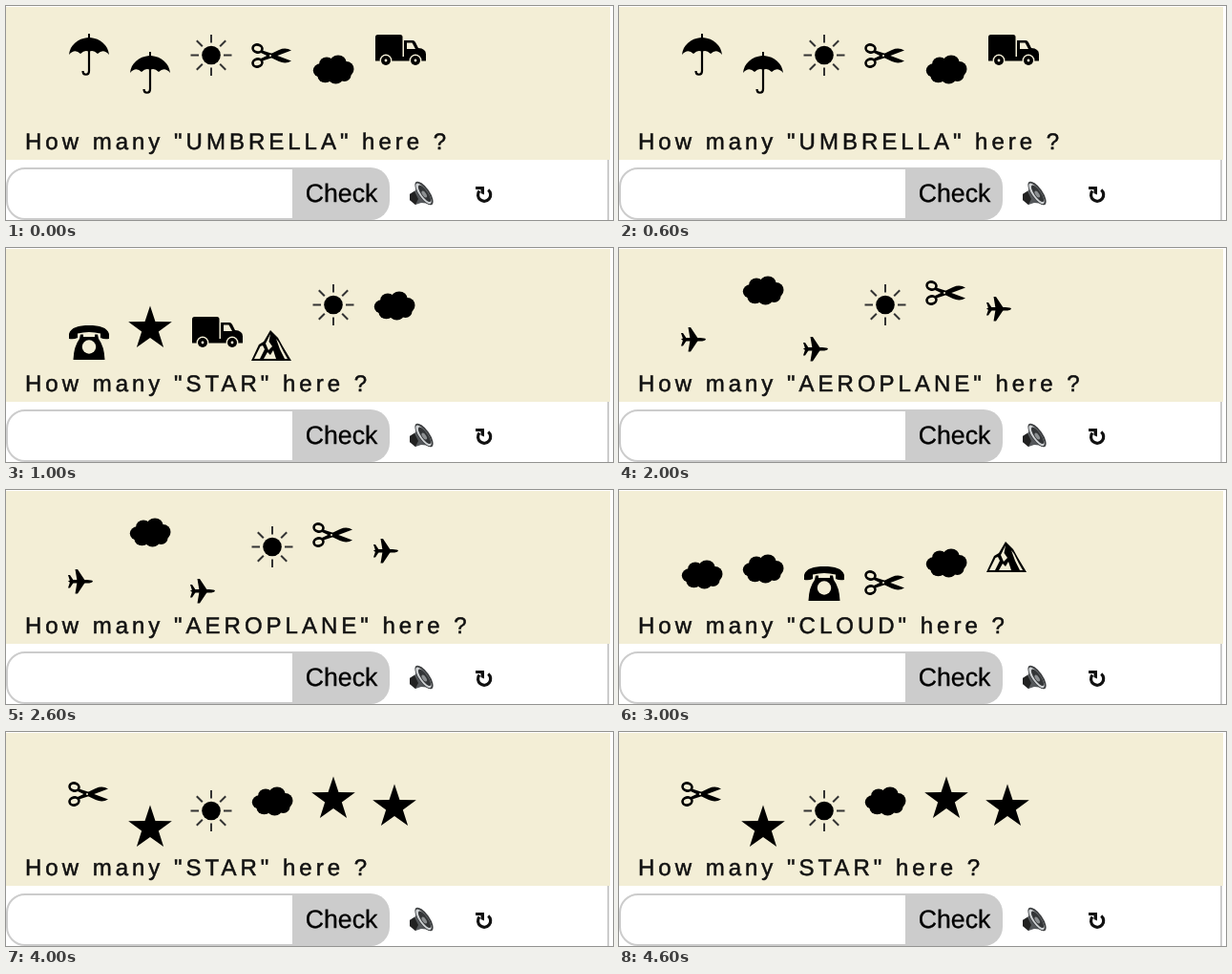
Write an HTML page with a canvas that moves like this. It is 636 px wide and 224 px high and loops after 5000 ms.

```html
<!DOCTYPE html>
<html lang="en">
<head>
<meta charset="utf-8">
<title>Picture quiz</title>
<style>
  html, body { margin: 0; width: 100%; height: 100%; overflow: hidden; background: #fff; }
  #stage { position: relative; width: 636px; height: 224px; }
  canvas { position: absolute; left: 0; top: 0; }
  p {
    position: absolute; margin: 0; white-space: pre; color: #000;
    font-family: "Liberation Sans", Arial, sans-serif;
    font-kerning: normal; text-rendering: geometricPrecision;
  }
  #ask {
    left: 20px; top: 129px; font-size: 24px; line-height: 27px; letter-spacing: 4px;
    color: #111; -webkit-text-stroke: 0.5px #111; filter: blur(0.6px);
  }
  #check { left: 313.8px; top: 181px; font-size: 26.667px; line-height: 30px; -webkit-text-stroke: 0.3px #000; }
</style>
</head>
<body>
<div id="stage">
  <canvas id="view" width="636" height="224"></canvas>
  <p id="ask"></p>
  <p id="check">Check</p>
</div>
<script>
const ctx = document.getElementById('view').getContext('2d');
const ask = document.getElementById('ask');
const PAPER = '#f3eed6';
const INK = '#000';
const CELL = 64;
const HOLD = 1000;

function fill(d, color = INK) {
  ctx.fillStyle = color;
  ctx.fill(new Path2D(d));
}

function line(d, width, color = INK) {
  ctx.strokeStyle = color;
  ctx.lineWidth = width;
  ctx.stroke(new Path2D(d));
}

function oval(x, y, rx, ry = rx, color = INK) {
  ctx.fillStyle = color;
  ctx.beginPath();
  ctx.ellipse(x, y, rx, ry, 0, 0, Math.PI * 2);
  ctx.fill();
}

function ring(x, y, rx, ry, width, turn = 0) {
  ctx.strokeStyle = INK;
  ctx.lineWidth = width;
  ctx.beginPath();
  ctx.ellipse(x, y, rx, ry, turn, 0, Math.PI * 2);
  ctx.stroke();
}

// Each icon draws from its own top left corner.
const icons = {
  umbrella() {
    fill('M0 22C1 12 9 5 20 4V0H22V4C33 5 41 12 42 22Q36 15 30 21Q25 16 21 19Q17 16 12 21Q6 15 0 22Z');
    line('M21 17V39C21 44 14.5 44 14.5 39', 2.2);
  },
  sun() {
    oval(21, 21.5, 9.8);
    for (let i = 0; i < 8; i++) {
      const c = Math.cos(i * Math.PI / 4), s = Math.sin(i * Math.PI / 4);
      line(`M${21 + 13 * c} ${21.5 + 13 * s}L${21 + 21.5 * c} ${21.5 + 21.5 * s}`, 2, '#333');
    }
  },
  scissors() {
    ring(6.5, 6.5, 5, 4, 2.6, 0.25);
    ring(6.5, 21.5, 5, 4, 2.6, -0.25);
    fill('M10 8L20 11.3L42 19.5Q36 23 29 20L10 11Z');
    fill('M10 20L20 16.7L42 8.5Q36 5 29 8L10 17Z');
    oval(20, 14, 1, 1, PAPER);
  },
  cloud() {
    oval(21.5, 15.5, 17, 11);
    oval(14.5, 9.5, 7.8, 7);
    oval(26.5, 8.5, 8.8, 8);
    oval(8, 16.5, 7.7, 7.2);
    oval(35, 15, 8, 8);
    oval(13, 22.5, 8, 6.8);
    oval(24, 23.5, 8, 7);
    oval(33, 21.5, 7, 6.5);
  },
  truck() {
    fill('M2.5 0.5H26Q28.5 0.5 28.5 3V25H0V3Q0 0.5 2.5 0.5Z');
    fill('M30 6.5H39Q41 6.5 42 8.5L45 14.5Q53 15 53 21V28H0V23.5H30Z');
    fill('M33 9H38.5L42 15.5H33Z', PAPER);
    for (const x of [11, 42]) {
      oval(x, 27.5, 6.4, 6.4, PAPER);
      oval(x, 27.5, 5);
      oval(x, 27.5, 1.4, 1.4, PAPER);
    }
  },
  phone() {
    fill('M0 14V9C2 2 10 0 21 0S40 2 42 9V14Q37 15 33 13V8.5Q21 5.5 9 8.5V13Q5 15 0 14Z');
    fill('M12 9.5H15V12H27V9.5H30L31 14Q37 22 37.5 36H4.5Q5 22 11 14Z');
    oval(21, 22.5, 7.2, 7.2, PAPER);
  },
  star() {
    let d = 'M';
    for (let i = 0; i < 10; i++) {
      const r = i % 2 ? 9.3 : 24, a = i * Math.PI / 5;
      d += `${22 + r * Math.sin(a)} ${23.6 - r * Math.cos(a)} `;
    }
    fill(d + 'Z');
  },
  mountain() {
    fill('M0 32L8 15L13 12L20 0L28 8L33 17L42 32Z');
    fill('M3 30L9.5 17L12 16L14 20L12 24L9 30Z', PAPER);
    fill('M15 14L20 4L18.5 12L22 17L18 21Z', PAPER);
    fill('M13 30L17 23L20 26L23 21L26 30Z', PAPER);
    fill('M26 9L29 13L34 23L38 30H35L30 20Z', PAPER);
  },
  plane() {
    fill('M0 12.5L3 11H20Q25 11 26 12.5Q25 14.5 20 14.5H3Z');
    fill('M9.5 12L7.5 0H10L18 12V13.5L10 25.5H7.5L9.5 13.5Z');
    fill('M2 12L0 6H2L6 12V13.5L2 19.5H0L2 13.5Z');
  }
};

// Left inset of each icon inside its cell.
const inset = {
  umbrella: 2, sun: 2, scissors: 1, cloud: 1.5, truck: 3,
  phone: 2, star: 1, mountain: 1, plane: 1
};

const rounds = [
  ['UMBRELLA', 'umbrella 29, umbrella 48, sun 30, scissors 38, cloud 51, truck 29.5'],
  ['STAR', 'phone 81, star 61, truck 71.5, mountain 86, sun 38, cloud 45'],
  ['AEROPLANE', 'plane 83, cloud 29, plane 93, sun 38, scissors 33, plane 51'],
  ['CLOUD', 'cloud 73, cloud 67, phone 80, scissors 83, cloud 61, mountain 54'],
  ['STAR', 'scissors 51, star 77, sun 61, cloud 57, star 47, star 55']
];

function drawSpeaker() {
  ctx.save();
  ctx.translate(438, 196);
  fill('M-15 1L-9 -3L-7 -12L8 11L-3 10L-9 12L-15 7Z', '#55585b');
  fill('M-15 1L-10 -2L-6 6L-9 12L-15 7Z', '#222');
  ctx.rotate(0.96);
  oval(0, 0, 14.5, 5.8, '#3c3e40');
  oval(0, 0.6, 12.8, 4.4, '#d0d3d5');
  oval(0.5, -0.3, 10.5, 3.4, '#333537');
  oval(1, 0.4, 4, 1.9, '#8d9092');
  ctx.restore();
}

function drawReload() {
  line('M505.2 192.5A6.6 6.6 0 1 1 496 193.5', 3.2, '#111');
  fill('M492 189H501V197.5L497.5 196V192H492Z', '#111');
}

function drawControls() {
  ctx.fillStyle = '#ccc';
  ctx.beginPath();
  ctx.roundRect(300, 169, 102, 55, [0, 20, 20, 0]);
  ctx.fill();
  ctx.strokeStyle = '#ccc';
  ctx.lineWidth = 2;
  ctx.beginPath();
  ctx.roundRect(1, 170, 300, 53, [19, 0, 0, 19]);
  ctx.stroke();
  ctx.fillRect(630, 161, 2, 63);
  drawSpeaker();
  drawReload();
}

function drawRound([word, list]) {
  ctx.clearRect(0, 0, 636, 224);
  ctx.fillStyle = PAPER;
  ctx.fillRect(0, 1, 633, 160);
  ctx.filter = 'blur(0.65px)';
  list.split(', ').forEach((item, i) => {
    const [name, y] = item.split(' ');
    ctx.save();
    ctx.translate(CELL * (i + 1) + inset[name], +y);
    icons[name]();
    ctx.restore();
  });
  ctx.filter = 'none';
  drawControls();
  ask.textContent = `How many "${word}" here ?`;
}

let shown = -1;
function tick() {
  const now = Math.floor(performance.now() / HOLD) % rounds.length;
  if (now !== shown) {
    shown = now;
    drawRound(rounds[now]);
  }
  requestAnimationFrame(tick);
}
tick();
</script>
</body>
</html>
```
